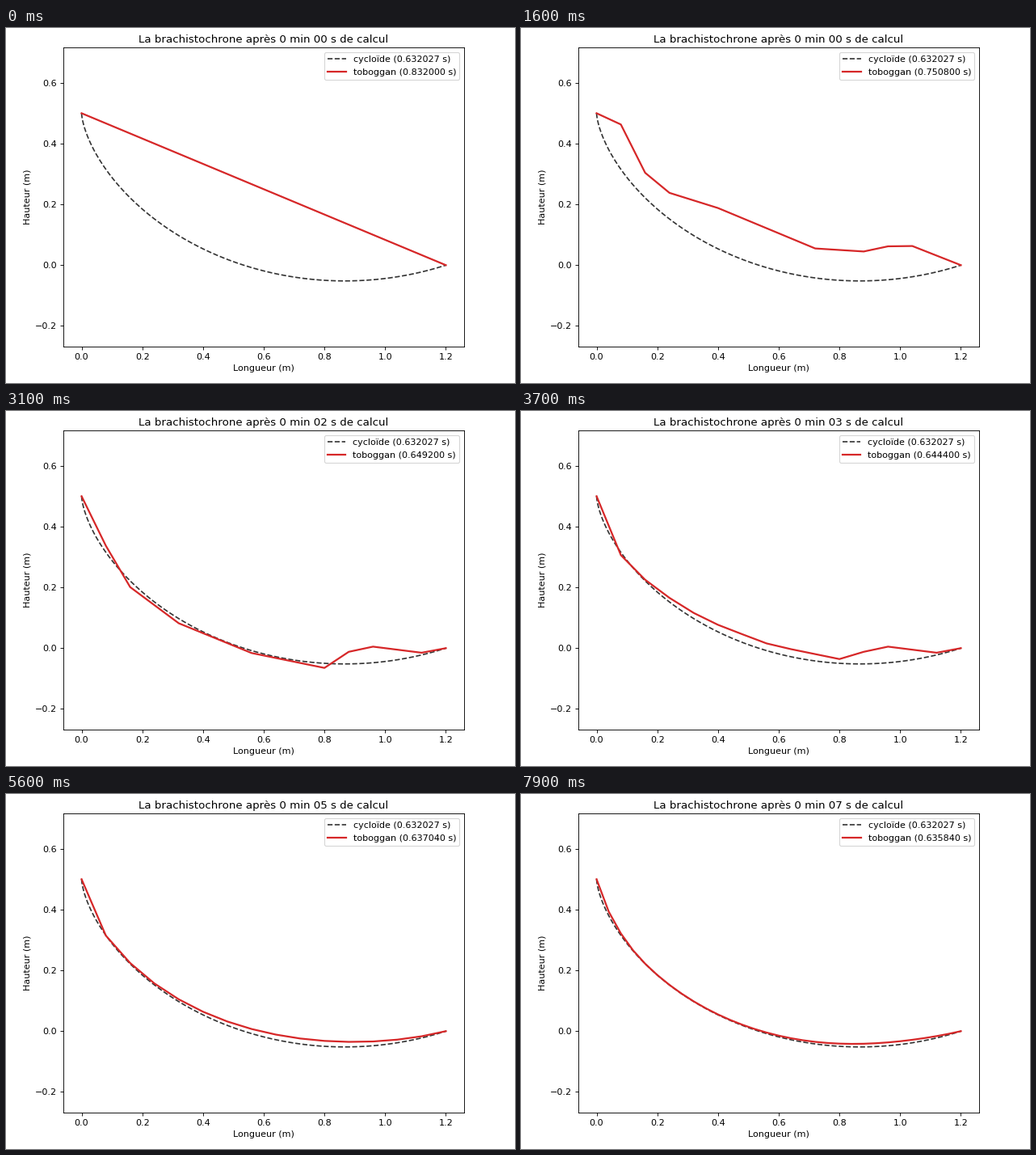
These frames come from a looping animation (630 by 439 pixels, 8 s). A matplotlib script:

```python
import random

import matplotlib.pyplot as plt
import numpy as np
from matplotlib.animation import FuncAnimation

W, H, DPI = 630, 439, 80
FRAMES, INTERVAL = 80, 100
LENGTH, HEIGHT = 1.2, 0.5
COARSE = np.linspace(0, LENGTH, 16)
FINE = np.linspace(0, LENGTH, 31)

# frames on which the slide rests, and frames where the clock ticks
IDLE = {0, 1, 48, 52, 53, 60, 62, 63, 68, 74}
TICKS = [18, 25, 35, 47, 55, 69, 77]


def cycloid():
    theta = np.linspace(0.01, 6, 5000)
    ratio = (theta - np.sin(theta)) / (1 - np.cos(theta))
    end = np.interp(LENGTH / HEIGHT, ratio, theta)
    r = HEIGHT / (1 - np.cos(end))
    a = np.linspace(0, end, 400)
    return r * (a - np.sin(a)), HEIGHT - r * (1 - np.cos(a))


IDEAL = cycloid()


def through(*points):
    """Slide that runs straight between a few points."""
    x, y = zip((0, HEIGHT), *points, (LENGTH, 0))
    return np.interp(COARSE, x, y)


def near(x, sag, skew, start):
    """Cycloid with a skewed bulge and an error next to the start."""
    bulge = sag * np.sin(np.pi * (x / LENGTH) ** skew)
    error = start * np.exp(-(x / 0.08) ** 2) * (x > 0)
    return np.interp(x, *IDEAL) + bulge + error


# (frame, descent time, heights)
STAGES = [
    (0, 0.8320, through()),
    (16, 0.7508, through((0.08, 0.463), (0.16, 0.304), (0.24, 0.238),
                         (0.4, 0.188), (0.72, 0.055), (0.88, 0.045),
                         (0.96, 0.062), (1.04, 0.063))),
    (31, 0.6492, through((0.08, 0.337), (0.16, 0.201), (0.32, 0.082),
                         (0.56, -0.016), (0.8, -0.065), (0.88, -0.012),
                         (0.96, 0.005), (1.12, -0.015))),
    (44, 0.6392, near(COARSE, 0.031, 1.2, -0.035)),
    (56, 0.63704, np.interp(FINE, COARSE, near(COARSE, 0.018, 1.5, -0.005))),
    (69, 0.63648, near(FINE, 0.013, 1.5, 0.028)),
    (79, 0.63584, near(FINE, 0.011, 3, 0.017)),
]


def find_shifts(delta):
    """Split a change of heights into shifts of runs of nodes."""
    found, opened = [], []
    for j, d in enumerate(np.diff(delta), 1):
        while abs(d) > 1e-9 and opened and opened[-1][1] * d < 0:
            i, s = opened.pop()
            step = np.sign(s) * min(abs(s), abs(d))
            found.append((i, j, step))
            d += step
            if abs(s - step) > 1e-9:
                opened.append((i, s - step))
        if abs(d) > 1e-9:
            opened.append((j, d))
    return found


def plan():
    """List the nodes, heights and descent time of every frame."""
    rng = random.Random(4)
    states = [(COARSE, STAGES[0][2], STAGES[0][1])]
    for (f0, t0, y0), (f1, t1, y1) in zip(STAGES, STAGES[1:]):
        x = COARSE if len(y1) == len(COARSE) else FINE
        dt = 0.0004 if x is COARSE else 0.00008
        if len(y0) != len(x):
            y0 = np.interp(x, COARSE, y0)
        active = [f for f in range(f0 + 1, f1 + 1) if f not in IDLE]
        moves = find_shifts(y1 - y0)
        while len(moves) < len(active):
            moves.sort(key=lambda m: abs(m[2]))
            i, j, s = moves.pop()
            moves += [(i, j, s / 2)] * 2
        rng.shuffle(moves)
        for f in range(f0 + 1, f1 + 1):
            done = sum(a <= f for a in active) / len(active)
            y = y0.copy()
            for i, j, s in moves[:round(done * len(moves))]:
                y[i:j] += s
            t = round((t0 + (t1 - t0) * done) / dt) * dt
            states.append((x, y, t))
    return states


def title(seconds):
    return f"La brachistochrone après 0 min {seconds:02d} s de calcul"


def label(t):
    return f"toboggan ({t:.6f} s)"


STATES = plan()

fig = plt.figure(figsize=((W + 0.001) / DPI, (H + 0.001) / DPI), dpi=DPI,
                 facecolor="white")
left, right, top, bottom = 71, 567, 24.2, 393.8
ax = fig.add_axes([left / W, 1 - bottom / H,
                   (right - left) / W, (bottom - top) / H])
ax.plot(*IDEAL, "--", color="#333333", lw=1.5,
        label="cycloïde (0.632027 s)")
slide, = ax.plot([], [], color="tab:red", lw=2, label=label(STATES[0][2]))
ax.set_xlim(-0.06, 1.26)
ax.set_ylim(-0.2675, 0.7161)
ax.set_xticks(np.arange(7) * 0.2)
ax.set_yticks(np.arange(-1, 4) * 0.2)
ax.set_xlabel("Longueur (m)")
ax.set_ylabel("Hauteur (m)")
heading = ax.set_title(title(0))
timing = ax.legend(loc="upper right").get_texts()[1]


def update(frame):
    x, y, t = STATES[frame]
    slide.set_data(x, y)
    timing.set_text(label(t))
    heading.set_text(title(sum(frame >= k for k in TICKS)))
    return slide, timing, heading


anim = FuncAnimation(fig, update, frames=FRAMES, interval=INTERVAL,
                     init_func=lambda: update(0), repeat=True)
plt.show()
```
